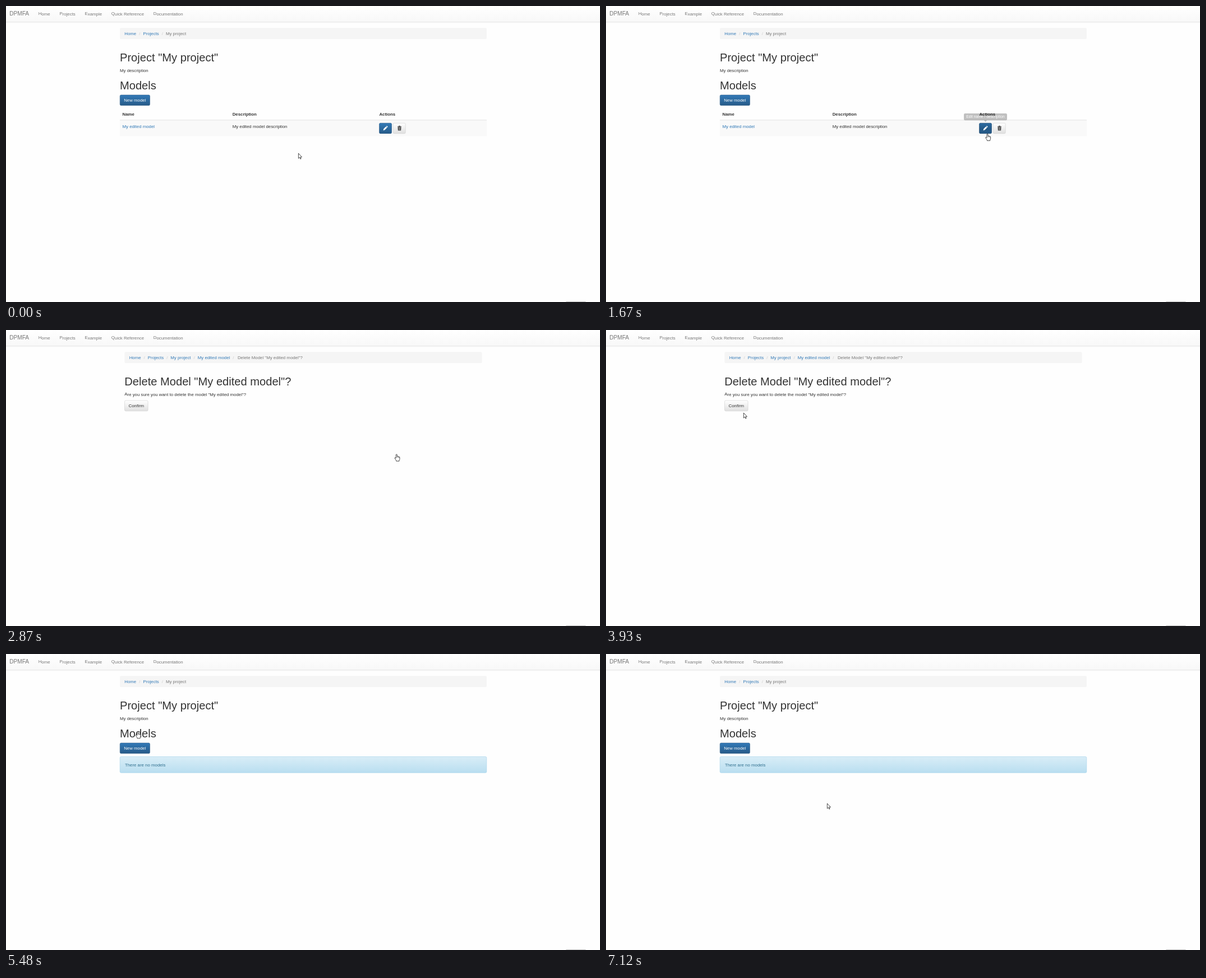
An HTML page for the animation above (7.19 s loop, 1059 px wide and 529 px high).

```html
<!DOCTYPE html>
<html lang="en">
<head>
<meta charset="utf-8">
<title>Delete a model</title>
<style>
  html, body { margin: 0; width: 100%; height: 100%; overflow: hidden; background: #fefefe; }
  svg { display: block; width: 1059px; height: 529px; font: 7.83px "Liberation Sans", Arial, sans-serif; fill: #333; }
  /* The tiny rotation keeps baselines from snapping to whole pixels. */
  text { white-space: pre; letter-spacing: .01px; transform-box: fill-box; transform: rotate(.02deg); }
  .nav, .here { fill: #777; }
  .brand { font-size: 10.07px; }
  .title { font-size: 20.13px; letter-spacing: 0; }
  .link { fill: #337ab7; }
  .slash { fill: #ccc; }
  .bold { font-weight: bold; }
  .primary { fill: url(#blue); stroke: #245580; stroke-width: .56; }
  .primary.hover { fill: url(#blueHover); stroke: #1b4166; }
  .default { fill: url(#gray); stroke: #ccc; stroke-width: .56; }
  .default.hover { fill: url(#grayHover); stroke: #adadad; }
  .default.focus { fill: #e0e0e0; stroke: #5b94d6; stroke-width: 1; }
  .tip { font-size: 6.71px; text-anchor: middle; }
  .tip text { fill: #fff; }
  .cursor { fill: #fff; stroke: #111; stroke-width: .75; stroke-linejoin: round; }
</style>
</head>
<body>
<svg viewBox="0 0 1059 529">
  <defs>
    <linearGradient id="bar" x2="0" y2="1"><stop stop-color="#fff"/><stop offset="1" stop-color="#f8f8f8"/></linearGradient>
    <linearGradient id="shade" x2="0" y2="1"><stop stop-opacity=".05"/><stop offset="1" stop-opacity="0"/></linearGradient>
    <linearGradient id="blue" x2="0" y2="1"><stop stop-color="#337ab7"/><stop offset="1" stop-color="#265a88"/></linearGradient>
    <linearGradient id="blueHover" x2="0" y2="1"><stop stop-color="#2d6ca2"/><stop offset=".56" stop-color="#265a88"/></linearGradient>
    <linearGradient id="gray" x2="0" y2="1"><stop stop-color="#fff"/><stop offset="1" stop-color="#e0e0e0"/></linearGradient>
    <linearGradient id="grayHover" x2="0" y2="1"><stop stop-color="#f1f1f1"/><stop offset=".56" stop-color="#e0e0e0"/></linearGradient>
    <linearGradient id="info" x2="0" y2="1"><stop stop-color="#d9edf7"/><stop offset="1" stop-color="#b9def0"/></linearGradient>
  </defs>

  <rect width="1059" height="28" fill="url(#bar)"/>
  <rect y="28" width="1059" height=".6" fill="#e4e4e4"/>
  <rect y="28.6" width="1059" height="2.6" fill="url(#shade)"/>
  <text class="nav brand" x="6.3" y="17">DPMFA</text>
  <g class="nav">
    <text x="57.7" y="16.5">Home</text>
    <text x="95.4" y="16.5">Projects</text>
    <text x="140.5" y="16.5">Example</text>
    <text x="187.7" y="16.5">Quick Reference</text>
    <text x="262.8" y="16.5">Documentation</text>
  </g>
  <rect x="998.5" y="528" width="35" height="1" fill="#c4c4c4"/>

  <g id="project">
    <rect x="203" y="39.2" width="654" height="20.1" rx="2.2" fill="#f5f5f5"/>
    <text x="211.3" y="51.9" class="crumbs" data-path="Home|Projects|My project"></text>
    <text class="title" x="203" y="99.4">Project "My project"</text>
    <text x="203" y="117.5">My description</text>
    <text class="title" x="203" y="149.4">Models</text>
    <rect class="primary" x="203.2" y="159" width="53.3" height="18.7" rx="2"/>
    <text x="210.2" y="171" fill="#fff">New model</text>

    <g id="table">
      <g class="bold">
        <text x="207.5" y="196.1">Name</text>
        <text x="403.7" y="196.1">Description</text>
        <text x="665.4" y="196.1">Actions</text>
      </g>
      <rect x="203" y="203.5" width="654" height="1.1" fill="#ddd"/>
      <rect x="203" y="204.6" width="654" height="28.2" fill="#f9f9f9"/>
      <text class="link" x="207.5" y="217.5">My edited model</text>
      <text x="403.7" y="217.5">My edited model description</text>
      <rect id="edit" class="primary" x="665.5" y="209.3" width="22" height="18.6" rx="2"/>
      <path fill="#fff" d="M672.5 222.4l.8-2.8 4-4 2 2-4 4zM677.8 215.1l.7-.7q.5-.5 1 0l1 1q.5.5 0 1l-.7.7z"/>
      <rect id="trash" class="default" x="690.2" y="209.3" width="22" height="18.6" rx="2"/>
      <path d="M698 215.2h7v1.1h-7zM700 215.2v-1.2h3v1.2h-.7v-.5h-1.6v.5zM698.5 216.8h6l-.4 5.6h-5.2z"/>
      <path d="M700.2 217.6v4M701.5 217.6v4M702.8 217.6v4" stroke="#eee" stroke-width=".5"/>
    </g>
    <g id="empty">
      <rect x="203.2" y="183.5" width="653.6" height="28.7" rx="2" fill="url(#info)" stroke="#9acfea" stroke-width=".56"/>
      <text x="211.9" y="200.7" fill="#31708f">There are no models</text>
    </g>
  </g>

  <g id="removal">
    <rect x="211.3" y="39.2" width="637.4" height="20.1" rx="2.2" fill="#f5f5f5"/>
    <text x="219.7" y="51.9" class="crumbs" data-path="Home|Projects|My project|My edited model|Delete Model &quot;My edited model&quot;?"></text>
    <text class="title" x="211.3" y="99.4">Delete Model "My edited model"?</text>
    <text x="211.3" y="117.5">Are you sure you want to delete the model "My edited model"?</text>
    <rect id="confirm" class="default" x="211.5" y="126.1" width="41.6" height="18.7" rx="2"/>
    <text x="218.6" y="138.1">Confirm</text>
  </g>

  <g id="editTip" class="tip">
    <path fill="#000" d="M673.7 204h5.6l-2.8 2.9z"/>
    <rect x="638" y="192" width="77" height="12.2" rx="2.2" fill="#000"/>
    <text x="676.5" y="200.4">Edit name / description</text>
  </g>
  <g id="trashTip" class="tip">
    <path fill="#000" d="M698.4 204h5.6l-2.8 2.9z"/>
    <rect x="677" y="192" width="48.4" height="12.2" rx="2.2" fill="#000"/>
    <text x="701.2" y="200.4">Delete model</text>
  </g>

  <path id="arrow" class="cursor" d="M.4.5V9.6L2.5 7.7 3.9 10.7 5.1 10.1 3.8 7.2H6.5Z"/>
  <g id="hand" class="cursor">
    <path d="M-1 .9Q0-.4 1 .9V4Q2.2 3.3 2.7 4.4 3.9 3.8 4.3 5 5.6 4.6 5.6 6.2V8.6Q5.6 10 4.7 11V12.5H-.6V11.3Q-2 9.5-3.2 7.3-3.3 5.8-2 6.3L-1 7.3Z"/>
    <path d="M1 4v2.2M2.7 4.4v2M4.3 5v1.6" stroke-width=".5"/>
  </g>
</svg>
<script>
const LOOP = 7190;
const $ = id => document.getElementById(id);

for (const el of document.querySelectorAll('.crumbs')) {
  const names = el.dataset.path.split('|');
  el.innerHTML = names.map((name, i) => {
    const last = i === names.length - 1;
    const gap = last && i > 2 ? 6.4 : 5;
    const slash = i ? `<tspan class="slash" dx="5">/</tspan>` : '';
    return `${slash}<tspan class="${last ? 'here' : 'link'}" dx="${i ? gap : 0}">${name}</tspan>`;
  }).join('');
}

// Pointer moves: first step time, last step time, steps, target x, target y
const START = [521, 262.8];
const MOVES = [
  [830, 1520, 10, 666, 230],
  [1600, 1670, 2, 680, 228.2],
  [1840, 2010, 3, 696.3, 221.8],
  [3200, 3880, 10, 258, 155],
  [3930, 3930, 1, 245, 147.6],
  [4010, 4170, 3, 234.5, 138.3],
  [5790, 6400, 9, 348, 221],
  [6510, 7120, 9, 394, 266.6]
];

const within = (t, a, b) => t >= a && t < b;
const show = (id, on) => $(id).style.display = on ? '' : 'none';
const state = (id, name, on) => $(id).classList.toggle(name, on);
const smooth = p => p * p * (3 - 2 * p);

function pointerAt(t) {
  let [x, y] = START;
  for (const [from, to, steps, x1, y1] of MOVES) {
    if (t < from) break;
    const interval = (to - from) / (steps - 1) || 1;
    const k = smooth(Math.min(steps, Math.floor((t - from) / interval + 1e-6) + 1) / steps);
    x += (x1 - x) * k;
    y += (y1 - y) * k;
  }
  return [x, y];
}

function fade(t, from, to) {
  if (!within(t, from, to + 80)) return 0;
  if (t >= to) return .3;
  return t < from + 85 ? .24 : .9;
}

function draw(t) {
  const removing = within(t, 2870, 5480);
  show('project', !removing);
  show('removal', removing);
  show('table', t < 2870);
  show('empty', t >= 5480);

  state('edit', 'hover', within(t, 1600, 1920));
  state('trash', 'hover', t >= 1930);
  state('trash', 'focus', t >= 2390);
  state('confirm', 'hover', t >= 4090);
  state('confirm', 'focus', t >= 4780);
  $('editTip').style.opacity = fade(t, 1670, 1930);
  $('trashTip').style.opacity = fade(t, 2010, 2790);

  const hand = within(t, 1600, 3200) || within(t, 4010, 5790);
  const [x, y] = pointerAt(t);
  show('hand', hand);
  show('arrow', !hand);
  $(hand ? 'hand' : 'arrow').setAttribute('transform', `translate(${x} ${y})`);
}

const begin = performance.now();
(function tick() {
  draw((performance.now() - begin) % LOOP);
  requestAnimationFrame(tick);
})();
</script>
</body>
</html>
```
